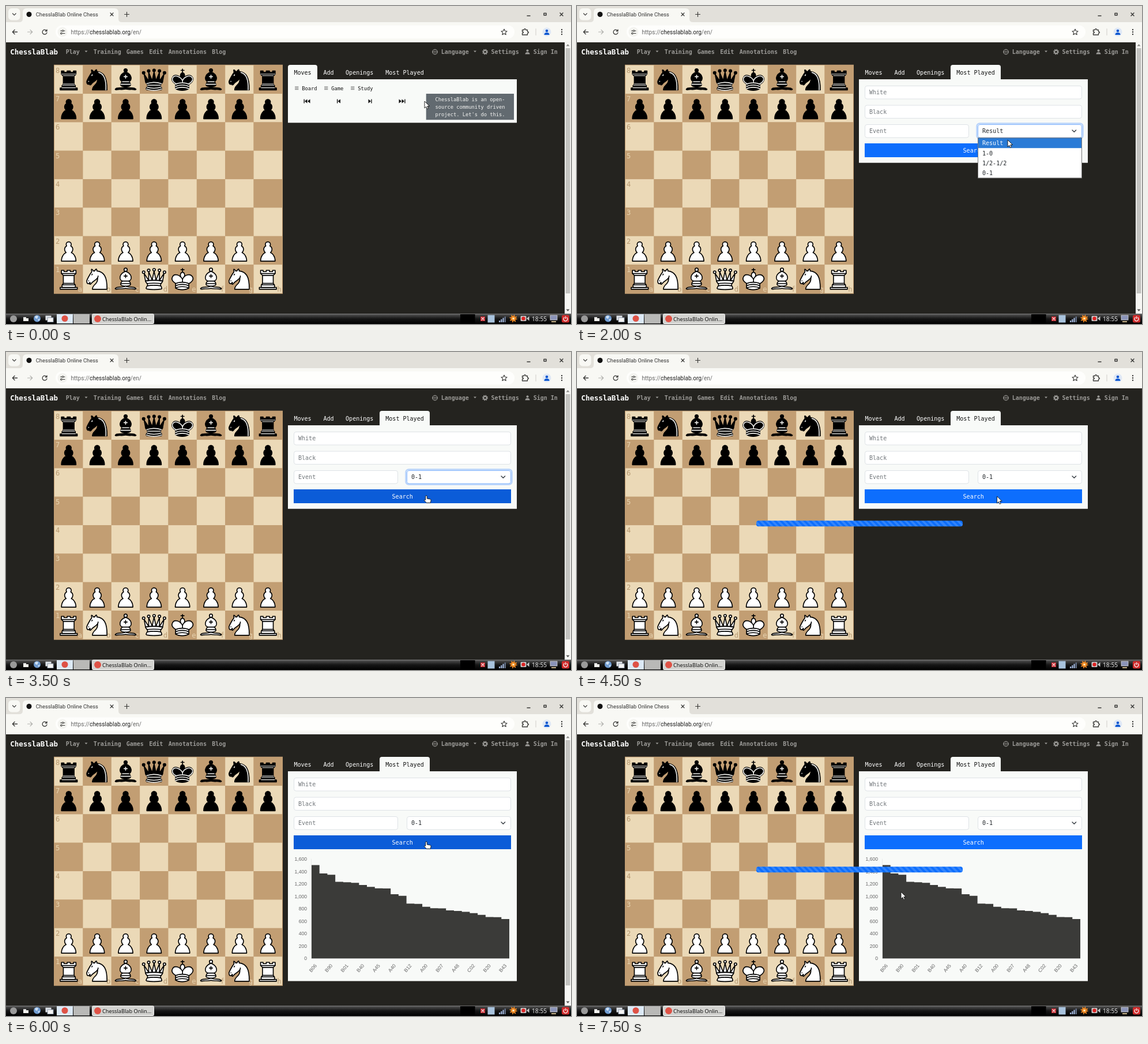
Recreate the animation shown at these times as an HTML page. Size 980 px wide and 551 px high, loop 8 s.

```html
<!DOCTYPE html>
<html lang="en">
<head>
<meta charset="utf-8">
<title>Chess search</title>
<style>
html, body { margin: 0; width: 100%; height: 100%; overflow: hidden; background: #24231f }
svg { display: block; width: 980px; height: 551px }
text { white-space: pre }
.mono { font-family: "DejaVu Sans Mono", monospace }
.ui { font-family: Roboto, sans-serif }
.bar { font-family: "Noto Sans", sans-serif }
.sans { font-family: "Liberation Sans", sans-serif }
.line { fill: none; stroke-linecap: round; stroke-linejoin: round }
</style>
</head>
<body>
<svg id="stage" viewBox="0 0 980 551">
  <defs>
    <linearGradient id="stripes" gradientUnits="userSpaceOnUse" x1="0" y1="0" x2="5.02" y2="-5.02" spreadMethod="repeat">
      <stop offset=".5" stop-color="#3184fd"/><stop offset=".5" stop-color="#0d6efd"/>
    </linearGradient>
    <linearGradient id="task" x2="0" y2="1">
      <stop stop-color="#777"/><stop offset=".15" stop-color="#444"/>
      <stop offset=".5" stop-color="#161616"/><stop offset="1" stop-color="#000"/>
    </linearGradient>
  </defs>
  <g id="fixed"></g>
  <g id="live"></g>
</svg>
<script>
const $ = id => document.getElementById(id);
const text = (x, y, s, size, fill, cls = 'mono', more = '') =>
  `<text x="${x}" y="${y}" font-size="${size}" fill="${fill}" class="${cls}" ${more}>${s}</text>`;
const rect = (x, y, w, h, fill, more = '') =>
  `<rect x="${x}" y="${y}" width="${w}" height="${h}" fill="${fill}" ${more}/>`;
const dot = (x, y, r, fill, more = '') => `<circle cx="${x}" cy="${y}" r="${r}" fill="${fill}" ${more}/>`;
const line = (d, stroke, w = 1.2) => `<path class="line" d="${d}" stroke="${stroke}" stroke-width="${w}"/>`;
const shape = (d, fill, more = '') => `<path d="${d}" fill="${fill}" ${more}/>`;

// Chess pieces on a 45 unit tile: body outlines, then inner details
const queenBase = 'M9 26c0 2 1.5 2 2.5 4 1 1.5 1 1 .5 3.5-1.5 1-1.5 2.5-1.5 2.5-1.5 1.5.5 2.5.5 2.5 6.5 1 16.5 1 23 0 0 0 1.5-1 0-2.5 0 0 .5-1.5-1-2.5-.5-2.5-.5-2 .5-3.5 1-2 2.5-2 2.5-4-8.5-1.5-18.5-1.5-27 0z';
const body = {
  p: 'M22.5 9c-2.21 0-4 1.79-4 4 0 .89.29 1.71.78 2.38C17.33 16.5 16 18.59 16 21c0 2.03.94 3.84 2.41 5.03C15.41 27.09 11 31.58 11 39.5H34c0-7.92-4.41-12.41-7.41-13.47C28.06 24.84 29 23.03 29 21c0-2.41-1.33-4.5-3.28-5.62.49-.67.78-1.49.78-2.38 0-2.21-1.79-4-4-4z',
  r: 'M9 39h27v-3H9zM12 36v-4h21v4zM12.5 32l1.5-2.5h17l1.5 2.5zM14 29.5V17h17v12.5zM14 17l-3-3h23l-3 3zM11 14V9h4v2h5V9h5v2h5V9h4v5z',
  n: 'M22 10c10.5 1 16.5 8 16 29H15c0-9 10-6.5 8-21M24 18c.38 2.91-5.55 7.37-8 9-3 2-2.82 4.34-5 4-1.04-.94 1.41-3.04 0-3-1 0 .19 1.23-1 2-1 0-4 1-4-4 0-2 6-12 6-12s1.89-1.9 2-3.5c-.73-1-.5-2-.5-3 1-1 3 2.5 3 2.5h2s.78-2 2.5-3c1 0 1 3 1 3',
  b: 'M9 36c3.39-.97 10.11.43 13.5-2 3.39 2.43 10.11 1.03 13.5 2 0 0 1.65.54 3 2-.68.97-1.65.99-3 .5-3.39-.97-10.11.46-13.5-1-3.39 1.46-10.11.03-13.5 1-1.35.49-2.32.47-3-.5 1.35-1.94 3-2 3-2zM15 32c2.5 2.5 12.5 2.5 15 0 .5-1.5 0-2 0-2 0-2.5-2.5-4-2.5-4 5.5-1.5 6-11.5-5-15.5-11 4-10.5 14-5 15.5 0 0-2.5 1.5-2.5 4 0 0-.5.5 0 2zM25 8a2.5 2.5 0 1 1-5 0 2.5 2.5 0 1 1 5 0z',
  q: 'M9 26c8.5-1.5 21-1.5 27 0l2.3-12.3L31 25V11l-5.5 13.5-3-14.5-3 14.5L14 11v14L6.7 13.7z' + queenBase +
    [[6, 12], [14, 9], [22.5, 8], [31, 9], [39, 12]].map(([x, y]) => `M${x - 2} ${y}a2 2 0 1 1 4 0 2 2 0 1 1-4 0z`).join(''),
  k: 'M22.5 11.6V6M20 8h5M22.5 25s4.5-7.5 3-10.5c0 0-1-2.5-3-2.5s-3 2.5-3 2.5c-1.5 3 3 10.5 3 10.5M11.5 37c5.5 3.5 15.5 3.5 21 0v-7s9-4.5 6-10.5c-4-6.5-13.5-3.5-16 4V27v-3.5c-3.5-7.5-13-10.5-16-4-3 6 5 10 5 10z'
};
const kingBands = 'M11.5 30c5.5-3 15.5-3 21 0m-21 3.5c5.5-3 15.5-3 21 0m-21 3.5c5.5-3 15.5-3 21 0';
const detail = {
  p: '', r: '', n: 'M9 25.5h.1M14.8 15l-.7 1.2',
  b: 'M17.5 26h10M15 30h15m-7.5-14.5v5M20 18h5',
  q: 'M11.5 30c3.5-1 18.5-1 22 0M12 33.5c6-1 15-1 21 0', k: kingBands
};
const darkDetail = {
  ...detail,
  r: 'M12 35.5h21M13 31.5h19M14 29.5h17M14 16.5h17M11 14h23',
  n: detail.n + 'M25 11.3c8 2 12 10 11.3 27.5',
  q: 'M11 29a35 35 1 0 1 23 0M12.5 31.5h20M11.5 34.5a35 35 1 0 0 22 0M10.5 37.5a35 35 1 0 0 24 0',
  k: kingBands + 'M32 29.5s8.5-4 6-9.65C34.2 14 25 18 22.5 24.5v2.1-2.1C20 18 9.9 14 7 19.85c-2.5 5.65 4.85 9 4.85 9'
};

const cell = 49.35, left = 84.1, top0 = 102.7, light = '#ebd9b7', dark = '#c29e73';

function piece(kind, col, row, black) {
  const parts = body[kind].split(/(?=M)/).map(d => shape(d, black ? '#000' : '#fff', 'stroke="#000"')).join('');
  return `<g transform="translate(${left + col * cell} ${top0 + row * cell}) scale(${cell / 45})" stroke-linecap="round" stroke-linejoin="round" stroke-width="1.5">
    ${parts}<path d="${(black ? darkDetail : detail)[kind]}" fill="none" stroke="${black ? '#ecece8' : '#000'}" stroke-width="${kind == 'r' ? 1 : 1.5}"/></g>`;
}

function board() {
  let squares = '', labels = '', men = '';
  for (let r = 0; r < 8; r++) for (let c = 0; c < 8; c++) {
    const pale = (r + c) % 2 == 0, x = left + c * cell, y = top0 + r * cell;
    squares += rect(x, y, cell, cell, pale ? light : dark);
    const ink = pale ? '#b89a72' : '#e6d3b0';
    if (!c) labels += text(x + 2, y + 13, 8 - r, 12.2, ink);
    if (r == 7) labels += text(x + 48, y + 46.5, 'abcdefgh'[c], 12.2, ink, 'mono', 'text-anchor="end"');
    if (r < 2 || r > 5) men += piece(r % 7 ? 'p' : 'rnbqkbnr'[c], c, r, r < 2);
  }
  return rect(83, 101.7, 397, 397, dark) + squares + labels + men;
}

function browser() {
  const ink = '#3a3a38', toolbar = '#f8f8f4';
  return rect(0, 0, 980, 63, '#e2e0da') + rect(0, 28, 980, 34.5, toolbar) +
    rect(4, 4, 20.5, 20.5, toolbar, 'rx="6"') + line('M11.5 13l2.8 2.8 2.8-2.8', ink) +
    shape('M23 28q6 0 6-6V11q0-7 7-7H188q7 0 7 7V22q0 6 6 6z', toolbar) +
    dot(40, 14.5, 4.5, '#111') +
    text(51.8, 17.9, 'ChesslaBlab Online Chess', 9.32, '#333', 'ui') +
    line('M181 12l5 5m0-5l-5 5M205.5 14.5h8m-4-4v8', ink) +
    line('M904 17h5M933 12.5h4v3.5h-4zM961 12l5 5m0-5l-5 5', ink, 1.5) +
    line('M19.5 45h-8m3.5-3.7L11.3 45l3.7 3.7', ink, 1.3) +
    line('M37.5 45h8m-3.5-3.7L45.7 45 42 48.7', '#b0b0ac') +
    line('M70.5 43a4 4 0 1 0 .5 3.2M71 40.8v2.7h-2.7', ink, 1.3) +
    rect(86, 33.5, 796, 23, '#fefefc', 'rx="11.5"') + dot(98, 45, 8.5, '#f4f4f0') +
    line('M94.5 43h2.5M99.5 43h2.5M94.5 47.5h.5M98 47.5h4', ink) +
    dot(98.5, 43, 1.4, 'none', `stroke="${ink}"`) + dot(96, 47.5, 1.4, 'none', `stroke="${ink}"`) +
    text(112.5, 48.6, 'https://<tspan fill="#1c1c1c">chesslablab.org</tspan>/en/', 10.04, '#666', 'ui') +
    line('M864 40l1.5 3.3 3.6.4-2.7 2.4.8 3.6-3.2-1.9-3.2 1.9.8-3.6-2.7-2.4 3.6-.4z', ink, 1.1) +
    line('M895.5 41.5h3q0-2 1.5-2t1.5 2h3v3q2 0 2 1.3t-2 1.3v2.9h-9v-3q2 0 2-1.2t-2-1.3z', ink, 1.3) +
    line('M919 39.5v11', '#cfcec8', 1) +
    dot(938, 45, 7.5, '#dfe8f5') + dot(938, 43, 2.3, '#0b57d0') + shape('M933.5 50q0-4 4.5-4t4.5 4z', '#0b57d0') +
    [41, 45, 49].map(y => dot(964, y, 1.2, ink)).join('');
}

function navbar() {
  const ink = '#9b9a97', bold = 'font-weight="bold"';
  const links = [[103.7, 'Play'], [151.7, 'Training'], [208.7, 'Games'], [248.3, 'Edit'], [281.8, 'Annotations'], [357.2, 'Blog'],
    [754.7, 'Language'], [841.5, 'Settings'], [914.7, 'Sign In']];
  return text(7.2, 83.7, 'ChesslaBlab', 12.5, '#fff', 'mono', bold) +
    links.map(([x, s]) => text(x, 83.3, s, 10, ink, 'mono', bold)).join('') +
    shape('M136.5 77.5h5l-2.5 2.8zM811 77.5h5l-2.5 2.8z', ink) +
    dot(744, 79.5, 4.3, 'none', `stroke="${ink}"`) +
    line('M739.7 79.5h8.6M744 75.2v8.6M741 76.5q-1.5 3 0 6M747 76.5q1.5 3 0 6', ink, .7) +
    dot(831, 79.5, 2.8, 'none', `stroke="${ink}" stroke-width="2"`) +
    dot(831, 79.5, 4.3, 'none', `stroke="${ink}" stroke-width="1.4" stroke-dasharray="1.7 1.68"`) +
    dot(904.5, 77.3, 2, ink) + shape('M900.5 83.5q0-3.5 4-3.5t4 3.5z', ink);
}

function taskbar() {
  const signal = [0, 1, 2, 3].map(i => rect(855 + i * 3.2, 545 - i * 2.3, 2.3, 3 + i * 2.3, i < 3 ? '#9fb4d8' : '#66748c')).join('');
  return rect(0, 533, 980, 18, 'url(#task)') +
    dot(13, 542, 6, '#9a9a9a') +
    rect(30, 539, 5, 3, '#ddd') + rect(30, 541, 9, 5, '#f2f2ee') +
    dot(54, 541.5, 6, '#6f9bd0') + shape('M50 538q4-3 6 0l-2 4-3-1zM55 543l4-1-2 4z', '#cfe0f2') +
    rect(68.5, 536.5, 10, 8, '#dfe4ea') + rect(72, 540, 10, 7.5, '#f5f5f5', 'stroke="#8b98a8"') +
    rect(88, 534, 28, 16, '#dce9f5') + dot(102, 541.5, 5.5, '#de5246') +
    rect(117, 534, 28, 16, '#b9b9b7') +
    rect(149.5, 533.5, 107, 17, '#d3d3d0', 'rx="2" stroke="#f0f0f0"') + dot(159, 542, 6, '#de5246') +
    text(167, 545.7, 'ChesslaBlab Onlin...', 9.2, '#111', 'bar') +
    rect(788, 534, 25.5, 16, '#000') +
    rect(823, 538, 8, 8, '#c5282f') + line('M825 540l4 4m0-4l-4 4', '#fff') +
    rect(835.5, 535.5, 12, 13, '#a9c3dd') + signal +
    dot(880, 541.5, 4.5, '#f08a24') + dot(880, 541.5, 5.3, 'none', 'stroke="#f08a24" stroke-width="2.5" stroke-dasharray="1.7 2.46"') + dot(880, 541.5, 1.7, '#fff0c0') +
    rect(892.5, 537, 10, 9, '#c9c9c9', 'rx="1.5"') + dot(897.5, 541.5, 3.2, '#d22') + shape('M903 541.5l4.5-4v8z', '#c9c9c9') +
    text(912, 545.5, '18:55', 10.2, '#e6e6e6', 'bar') +
    rect(944, 536, 12, 8, '#8a93b8', 'stroke="#ddd" stroke-width=".8"') + rect(946, 546, 8, 2, '#c8b48c') +
    rect(964, 535.5, 13, 13, '#cf2b2b', 'rx="2.5"') + line('M968.3 539.6a3.5 3.5 0 1 0 4.4 0M970.5 538v3.5', '#fff');
}

$('fixed').innerHTML = rect(0, 0, 980, 551, '#24231f') + browser() + navbar() + board() + taskbar();

const panelTint = '#f8faf8', fontSize = 10.04;
function tabs(active, hover) {
  const all = [[489, 51, 'Moves'], [540, 39, 'Add'], [579, 68.5, 'Openings'], [648, 87, 'Most Played']];
  return all.map(([x, w, s], i) => {
    const d = `M${x} 127.5V106q0-4 4-4h${w - 8}q4 0 4 4v21.5`;
    return (i == active ? shape(d, panelTint) : i == hover ? line(d, '#dee2e6', .7) : '') +
      text(x + w / 2, 118.5, s, fontSize, i == active ? '#111' : '#fff', 'mono', 'text-anchor="middle"');
  }).join('');
}

function movesPanel() {
  const menu = [[501.5, 'Board'], [552.5, 'Game'], [598.5, 'Study']].map(([x, s]) =>
    line(`M${x} 140h5.5m-5.5 2.3h5.5m-5.5 2.3h5.5`, '#444', .8) + text(x + 11.8, 145.7, s, 8.75, '#111')).join('');
  const prev = x => shape(`M${x} 165l4.5-3.5v7z`, '#111'), next = x => shape(`M${x} 165l-4.5-3.5v7z`, '#111');
  const bar = x => rect(x, 161.5, 1.3, 7, '#111');
  const notes = ['ChesslaBlab is an open-', 'source community driven', "project. Let's do this."];
  return rect(489, 127, 397, 75.3, panelTint) + menu +
    bar(516.5) + prev(518) + prev(523) + bar(574) + prev(575.5) +
    next(633) + bar(633.3) + next(686) + next(691) + bar(691.3) +
    rect(728.7, 152, 152.3, 45.2, '#626a70') +
    notes.map((s, i) => text(744.4, 165 + i * 13, s, 8.75, '#f4f4f2')).join('');
}

function field(x, y, w, label, ink = '#72777b', focus = false) {
  return (focus ? rect(x - 1.5, y - 1.5, w + 3, 26, 'none', 'rx="5" stroke="#b8d3fb" stroke-width="2.5"') : '') +
    rect(x + .5, y + .5, w - 1, 22.5, '#fff', `rx="3.5" stroke="${focus ? '#86b7fe' : '#dee2e6'}"`) +
    text(x + 8, y + 15.3, label, fontSize, ink);
}

function searchPanel(s) {
  return rect(489, 127, 397, s.chart ? 363.5 : 144.7, panelTint) +
    field(499, 138, 377, 'White') + field(499, 171.5, 377, 'Black') + field(499, 205, 181, 'Event') +
    field(695, 205, 181, s.result, '#212529', s.focus) + line('M859 215l3.3 3.3 3.3-3.3', '#343a40', 1.4) +
    rect(499, 238, 377, 24, s.press ? '#0b5cd8' : '#0d6efd') +
    text(687.7, 253.6, 'Search', fontSize, '#fff', 'mono', 'text-anchor="middle"') +
    (s.chart ? chart() : '') + (s.pick >= 0 ? options(s.pick) : '');
}

function options(pick) {
  return rect(695.5, 228.5, 180, 69.5, '#fff', 'stroke="#777"') +
    ['Result', '1-0', '1/2-1/2', '0-1'].map((s, i) => (i == pick ? rect(696, 229, 179, 17.2, '#2a7bd6') : '') +
      text(703, 241.3 + i * 17.2, s, fontSize, i == pick ? '#fff' : '#212529')).join('');
}

const games = [1505, 1370, 1350, 1235, 1228, 1220, 1185, 1155, 1130, 1128, 1035, 1010, 885, 880, 832, 810, 808, 775, 765, 752, 730, 703, 668, 665, 635];
const codes = 'B06 B90 B01 B40 A45 A40 B12 A00 B07 A48 C02 B20 B43'.split(' ');
function chart() {
  const step = 343 / games.length, y = v => 451.3 - v * .1075;
  let s = line('M529.5 279V451.5H873', '#e2e4e2', .7);
  for (let v = 0; v <= 1600; v += 200) s += text(522, y(v) + 3, v.toLocaleString('en-US'), 8.6, '#666', 'sans', 'text-anchor="end"');
  s += shape('M530 451.3' + games.map((v, i) => `V${y(v)}H${530 + (i + 1) * step}`).join('') + 'V451.3z', '#3b3b39');
  codes.forEach((c, i) => {
    s += text(0, 0, c, 8.6, '#666', 'sans', `text-anchor="end" transform="translate(${539.5 + i * 2 * step} 464) rotate(-50)"`);
  });
  return s;
}

const scrollbar = rect(969, 62.5, 11, 470.5, '#f7f7f4') + rect(970.5, 73, 8, 425, '#c3c3c0') +
  shape('M971.5 69.5l3-3.5 3 3.5z', '#8a8a88') + shape('M971.5 525.5l3 3.5 3-3.5z', '#555');

function cursor(x, y, hand) {
  const d = hand ? 'M-1.3 6.5V1.2a1.3 1.3 0 0 1 2.6 0V5l5.5 1q1.5.4 1.3 2l-.8 4.3H.3L-3.8 7.8q1-1.6 2.5-.2z'
    : 'M0 0V12L2.8 9.4 4.6 13.4 6.6 12.5 4.8 8.6H8.6Z';
  return shape(d, '#fff', `stroke="#111" stroke-width=".9" stroke-linejoin="round" transform="translate(${x} ${y})"`);
}

// One state per half second; each inherits from the one before
const steps = [
  { tab: 0, at: [726, 165], result: 'Result', pick: -1 },
  { at: [706, 117.5, true], hover: 3 },
  { tab: 3 },
  { at: [750, 213] },
  { at: [747, 232], pick: 0, focus: true },
  { at: [735, 285], pick: 3 },
  { pick: -1, result: '0-1' },
  { at: [729, 249, true], press: true },
  { at: [728.5, 250], press: false, focus: false, busy: true },
  {}, {}, {},
  { at: [729, 249, true], press: true, busy: false, chart: true },
  { at: [600, 310], press: false },
  { at: [562, 336] },
  { busy: true }
];
steps.reduce((a, b, i) => steps[i] = { ...a, ...b }, {});

function draw(i) {
  const s = steps[i];
  $('stripes').setAttribute('gradientTransform', `translate(${311 + i % 2 * 5.02} 302.3)`);
  $('live').innerHTML = tabs(s.tab, s.hover) + (s.tab ? searchPanel(s) : movesPanel()) +
    (s.busy ? rect(311, 292.3, 358, 10, 'url(#stripes)', 'rx="3.8"') : scrollbar) + cursor(...s.at);
}

const start = performance.now();
let shown = -1;
function tick(now) {
  const i = Math.floor(Math.max(0, now - start) % 8000 / 500);
  if (i != shown) draw(shown = i);
  requestAnimationFrame(tick);
}
draw(0);
requestAnimationFrame(tick);
</script>
</body>
</html>
```
